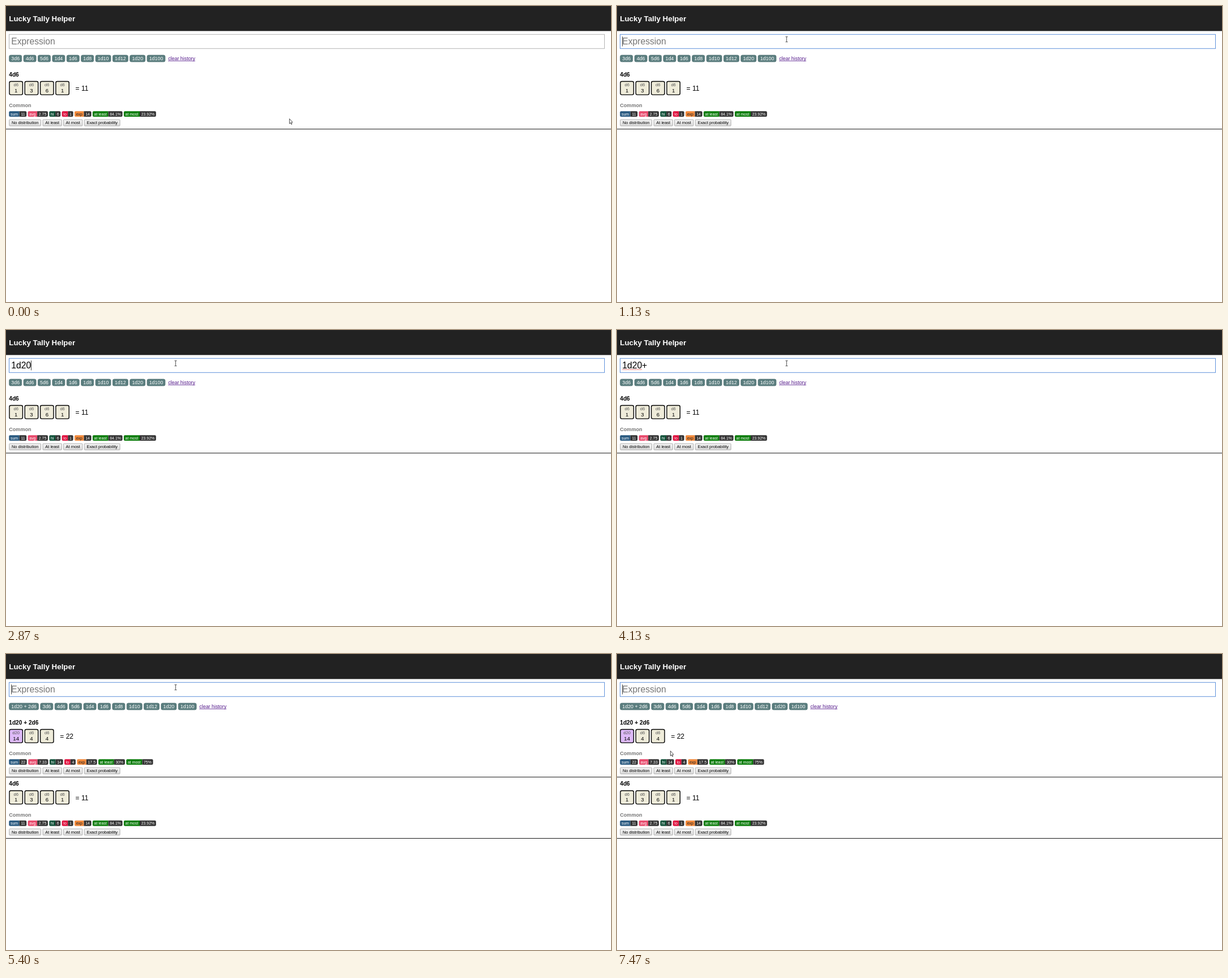
Write an HTML page with a canvas that moves like this. It is 1068x524 px and loops after 8 s.

```html
<!DOCTYPE html>
<html lang="en">
<head>
<meta charset="utf-8">
<title>Lucky Tally Helper</title>
<style>
  html, body { margin: 0; width: 100%; height: 100%; overflow: hidden; background: #fff; }
  canvas { display: block; width: 1068px; height: 524px; }
</style>
</head>
<body>
<canvas id="stage"></canvas>
<script>
const W = 1068, H = 524, LOOP = 8000;
const LEFT = 5.3, ROW = 108.5;
const canvas = document.getElementById('stage');
const ctx = canvas.getContext('2d');
const dpr = window.devicePixelRatio || 1;
canvas.width = W * dpr;
canvas.height = H * dpr;

const FAMILY = '"Liberation Sans", Arial, sans-serif';
const font = (size, bold) => `${bold ? 'bold ' : ''}${size}px ${FAMILY}`;

const HISTORY = ['3d6', '4d6', '5d6', '1d4', '1d6', '1d8', '1d10', '1d12', '1d20', '1d100'];
const BUTTONS = [['No distribution', 5.5, 56.3], ['At least', 64.7, 34], ['At most', 101.2, 34], ['Exact probability', 138, 63.4]];
const BADGES = [
  ['sum', '#2a5a80'], ['avg', '#e84a6c'], ['hi', '#12523a'], ['lo', '#e0123f'],
  ['exp', '#f28a3c'], ['at least', '#0b7d0b'], ['at most', '#0b7d0b']
];
const ROLLS = [
  { expr: '1d20 + 2d6', dice: [[20, 14], [6, 4], [6, 4]], total: 22,
    stats: ['22', '7.33', '14', '4', '17.5', '30%', '75%'] },
  { expr: '4d6', dice: [[6, 1], [6, 3], [6, 6], [6, 1]], total: 11,
    stats: ['11', '2.75', '6', '1', '14', '84.1%', '23.92%'] }
];

// [start time, field text, caret visible]
const TYPING = [
  [0, '', false], [1130, '', true], [1670, '1', true], [2000, '1d', true],
  [2270, '1d1', true], [2670, '1d', true], [2770, '1d2', true], [2870, '1d20', true],
  [3470, '1d20', false], [3600, '1d20+', true], [4130, '1d20+', false],
  [4330, '1d20+2', true], [4600, '1d20+2d', true], [4930, '1d20+2d6', true],
  [5400, '', true], [5870, '', false], [6400, '', true], [6930, '', false], [7470, '', true]
];
const FOCUS = 1000, SPELL = 3670, SUBMIT = 5400;

function text(str, x, y, size, color, bold, align = 'left') {
  ctx.font = font(size, bold);
  ctx.fillStyle = color;
  ctx.textAlign = align;
  ctx.fillText(str, x, y);
}

function measure(str, size) {
  ctx.font = font(size);
  return ctx.measureText(str).width;
}

function rounded(x, y, w, h, r, fill, stroke, line = 1) {
  ctx.beginPath();
  ctx.roundRect(x, y, w, h, r);
  ctx.fillStyle = fill;
  ctx.fill();
  if (stroke) {
    ctx.strokeStyle = stroke;
    ctx.lineWidth = line;
    ctx.stroke();
  }
}

function rect(x, y, w, h, color) {
  ctx.fillStyle = color;
  ctx.fillRect(x, y, w, h);
}

function drawField(t) {
  const [, value, caret] = TYPING.findLast(s => s[0] <= t);
  const x = 9.3, size = 15.65;
  ctx.strokeStyle = t < FOCUS ? '#b4b4b4' : '#5f92db';
  ctx.lineWidth = 1;
  ctx.strokeRect(5.5, 50.3, 1051, 25);
  text(value || 'Expression', x, 68, size, value ? '#000' : '#757575');
  if (t >= SPELL && t < SUBMIT) {
    ctx.beginPath();
    for (let i = 0; i <= 26; i++) ctx.lineTo(x + i * 1.33, i % 2 ? 69.4 : 70.6);
    ctx.strokeStyle = '#e8413c';
    ctx.lineWidth = 0.8;
    ctx.stroke();
  }
  if (caret) rect(Math.floor(x + measure(value, size)), 54, 1, 17.4, '#444');
}

function drawHistory(items) {
  const size = 8.85;
  let x = LEFT;
  for (const item of items) {
    const w = measure(item, size) + 8;
    rounded(x + 0.4, 87, w - 0.8, 11.8, 2.6, '#5a7d7e', '#4e7071', 0.8);
    text(item, x + 4, 96, size, '#fff');
    x += w + 2.65;
  }
  x += 2.2;
  text('clear history', x, 95.9, 8.9, '#551a8b');
  rect(x, 96.8, measure('clear history', 8.9), 0.8, '#551a8b');
}

function drawDie([sides, value], x, y) {
  rounded(x + 0.7, y + 0.7, 23.4, 23.6, 2.6, sides === 20 ? '#debaf7' : '#efecda', '#000', 1.4);
  text('d' + sides, x + 12.4, y + 9.4, 7.6, '#555', false, 'center');
  text(value, x + 12.4, y + 20, 9.6, '#000', false, 'center');
}

function drawBadges(stats, y) {
  const size = 6.93, pad = 2.67, h = 9.6;
  let x = LEFT;
  BADGES.forEach(([label, color], i) => {
    const lw = measure(label, size) + pad * 2;
    const vw = measure(stats[i], size) + pad * 2;
    rounded(x, y, lw, h, [2, 0, 0, 2], color);
    rounded(x + lw, y, vw, h, [0, 2, 2, 0], '#333');
    text(label, x + pad, y + 7.2, size, label === 'exp' ? '#222' : '#fff');
    text(stats[i], x + lw + pad, y + 7.2, size, '#fff');
    x += lw + vw + 2.4;
  });
}

function drawButton([label, x, w], y) {
  const shade = ctx.createLinearGradient(0, y, 0, y + 11);
  shade.addColorStop(0, '#f6f6f6');
  shade.addColorStop(1, '#dcdcdc');
  rounded(x + 0.3, y, w - 0.6, 11, 0.8, shade, '#a8a8a8', 0.9);
  text(label, x + w / 2, y + 8.1, 7.45, '#000', false, 'center');
}

function drawRoll(roll, y) {
  text(roll.expr, LEFT, y + 124.6, 10.15, '#000', true);
  roll.dice.forEach((die, i) => drawDie(die, LEFT + i * 27.3, y + 132.8));
  text('= ' + roll.total, 13.4 + roll.dice.length * 27.3, y + 150.2, 12, '#000');
  text('Common', LEFT, y + 179.3, 9.05, '#777', true);
  drawBadges(roll.stats, y + 186.3);
  BUTTONS.forEach(b => drawButton(b, y + 201.2));
  rect(0, y + 217.4, W, 1, '#111');
}

const mix = (a, b, p) => a + (b - a) * p;
const smooth = p => p * p * (3 - 2 * p);
const stepAt = (t, start) => Math.floor((t - start + 1) / (200 / 3)) + 1;

function pointer(t) {
  if (t < 130) return [500, 199];
  if (t < 800) {
    const u = stepAt(t, 130) / 11;
    const rise = Math.min(1, u / 0.83);
    const settle = Math.max(0, (u - 0.83) / 0.17);
    return [mix(500, 299.5, smooth(u)), mix(199, 56, smooth(rise)) + 3 * settle];
  }
  if (t < 6400) return [299.5, 59];
  const k = Math.min(13, stepAt(t, 6400));
  if (k <= 7) {
    const p = (k / 7) ** 2;
    return [mix(299.5, 206, p), mix(59, 113, p)];
  }
  const p = 1 - (1 - (k - 7) / 6) ** 2;
  return [mix(206, 94, p), mix(113, 171, p)];
}

function drawPointer([x, y]) {
  ctx.save();
  ctx.translate(x, y);
  ctx.beginPath();
  if (y > 50 && y < 76) {
    for (const s of [-1, 1]) {
      ctx.moveTo(-2, s * 4.6);
      ctx.lineTo(2, s * 4.6);
    }
    ctx.moveTo(0, -4.6);
    ctx.lineTo(0, 4.6);
    ctx.strokeStyle = '#444';
    ctx.lineWidth = 0.9;
  } else {
    const tip = [[0.4, 0.6], [0.4, 9.4], [2.3, 7.6], [3.6, 10.6], [4.9, 10], [3.6, 7.1], [6, 6.9]];
    tip.forEach(p => ctx.lineTo(...p));
    ctx.closePath();
    ctx.fillStyle = '#fff';
    ctx.fill();
    ctx.strokeStyle = '#222';
    ctx.lineWidth = 0.8;
  }
  ctx.stroke();
  ctx.restore();
}

function draw(t) {
  const rolled = t >= SUBMIT;
  ctx.setTransform(dpr, 0, 0, dpr, 0, 0);
  rect(0, 0, W, H, '#fff');
  rect(0, 0, W, 44.3, '#222');
  text('Lucky Tally Helper', LEFT, 26.7, 13.33, '#fff', true);
  drawField(t);
  drawHistory(rolled ? [ROLLS[0].expr, ...HISTORY] : HISTORY);
  (rolled ? ROLLS : ROLLS.slice(1)).forEach((roll, i) => drawRoll(roll, i * ROW));
  drawPointer(pointer(t));
}

function tick() {
  draw(performance.now() % LOOP);
  requestAnimationFrame(tick);
}
tick();
</script>
</body>
</html>
```
